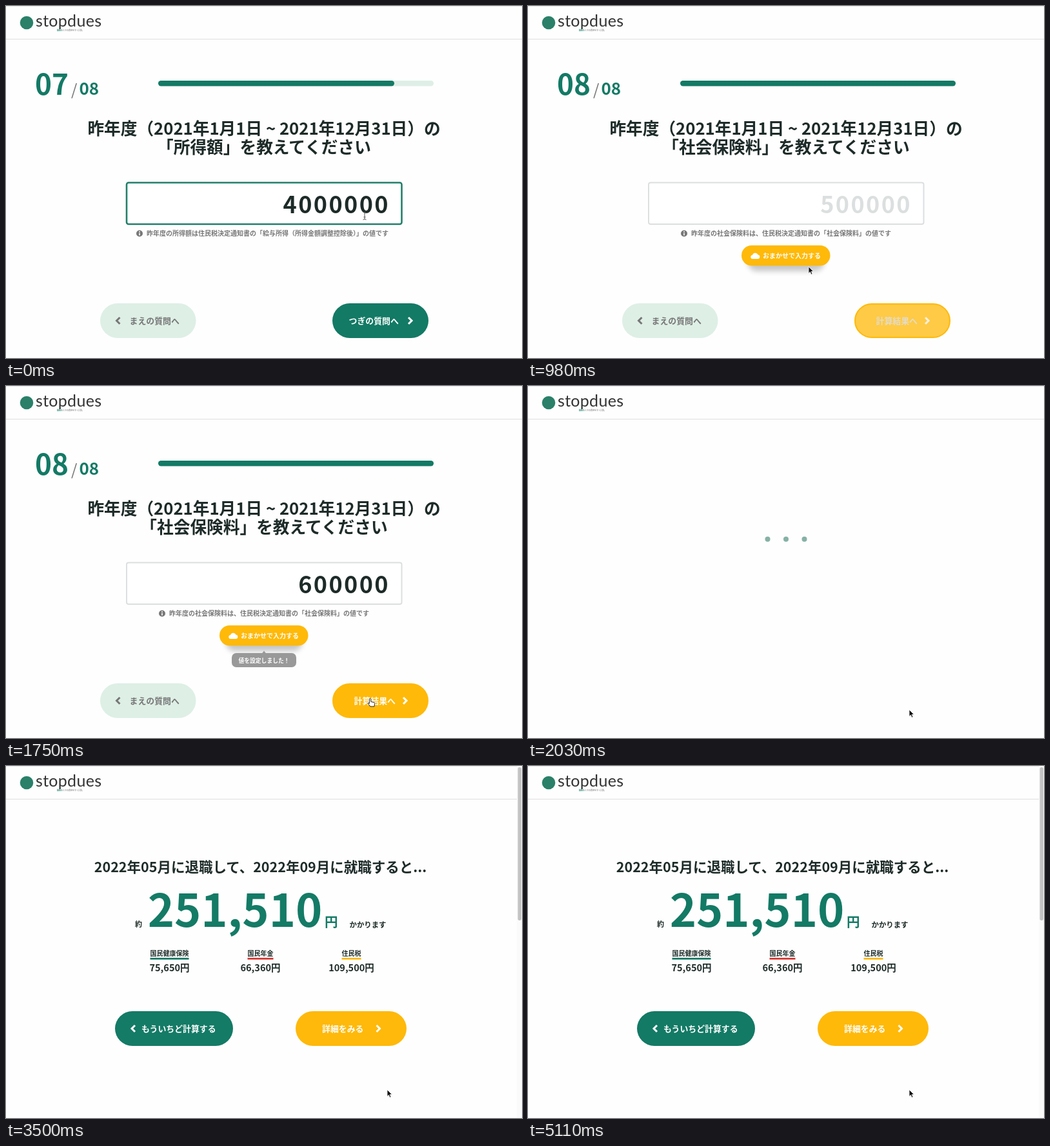
Recreate the animation shown at these times as an HTML page. Size 800 px wide and 547 px high, loop 5600 ms.

```html
<!DOCTYPE html>
<html lang="ja">
<head>
<meta charset="utf-8">
<title>退職費用の計算</title>
<style>
  html, body { margin: 0; width: 100%; height: 100%; overflow: hidden; background: #fefefe; }
  svg { display: block; width: 800px; height: 547px; }
  text { font-family: "Noto Sans CJK JP", "Noto Sans CJK", "Noto Sans", sans-serif; font-weight: 700; fill: #1d2b28; white-space: pre; }
  .mid { text-anchor: middle; }
  .green { fill: #137a65; }
  .white { fill: #fff; }
  .grey { fill: #777; }
  .title { font-size: 25.7px; text-anchor: middle; }
  .value { font-size: 36px; letter-spacing: 2.4px; text-anchor: end; }
  .hint { font-size: 10px; }
  .label { font-size: 12.9px; }
  .chev { fill: none; stroke-width: 3; }
</style>
</head>
<body>
<svg viewBox="0 0 800 547">
  <defs>
    <filter id="soft" x="-20%" y="-60%" width="140%" height="220%"><feGaussianBlur stdDeviation="4"/></filter>
  </defs>

  <g id="header">
    <path d="M0 .5H800" stroke="#e9e9e9"/>
    <path id="rule" d="M0 51.5H800" stroke="#dfdfdf"/>
    <circle cx="32" cy="26" r="10.3" fill="#2a8069"/>
    <text x="46" y="32" style="font:400 25px Lato,sans-serif;fill:#333;letter-spacing:.3px">stopdues</text>
    <text x="79" y="39" style="font-size:3px;fill:#999"><tspan class="green">辞めた</tspan>ときの費用をすぐ計算。</text>
  </g>

  <g id="form">
    <text id="step" class="green" x="45" y="138" font-size="44">07</text>
    <text x="101" y="139" style="font-size:24px;font-weight:400;fill:#777">/</text>
    <text class="green" x="113.5" y="138" font-size="26">08</text>
    <rect x="236" y="116" width="427" height="8.5" rx="4.2" fill="#deefe7"/>
    <rect id="bar" x="236" y="116" width="366" height="8.5" rx="4.2" fill="#137a65"/>

    <g id="body">
      <text class="title" x="400" y="200">昨年度（2021年1月1日 ~ 2021年12月31日）の</text>
      <text id="ask" class="title" x="400" y="229"></text>
      <rect id="box" x="187" y="274.5" width="426.5" height="64.5" rx="3" fill="#fff"/>
      <text id="value" class="value" x="595" y="322"></text>
      <g id="info">
        <circle cx="5" cy="353.5" r="5" fill="#777"/>
        <path d="M5 350v1.7M5 352.8v3.6" stroke="#fff" stroke-width="1.6"/>
        <text id="hint" class="hint grey" x="16" y="357"></text>
      </g>
    </g>

    <rect x="146" y="462" width="148.5" height="54" rx="27" fill="#deefe6"/>
    <path class="chev" d="M176.5 484l-5 5 5 5" stroke="#777"/>
    <text class="label grey" x="191.5" y="494">まえの質問へ</text>

    <g id="next">
      <rect x="506" y="462" width="149" height="54" rx="27" fill="#137a65"/>
      <path class="chev" d="M624 484l5 5-5 5" stroke="#fff"/>
      <text class="label white" x="531.5" y="494">つぎの質問へ</text>
    </g>

    <g id="last">
      <rect id="goBox" x="507" y="463" width="147" height="52" rx="26" stroke="#ffb909" stroke-width="2"/>
      <path id="goChev" class="chev" d="M616 484l5 5-5 5"/>
      <text id="goText" class="label" x="539.5" y="494">計算結果へ</text>
    </g>

    <g id="assist">
      <rect x="341" y="384" width="118" height="28" rx="14" fill="#000" opacity=".22" filter="url(#soft)"/>
      <rect id="autoBox" x="331" y="372" width="137.5" height="31.5" rx="15.7"/>
      <path d="M348.5 393a3 3 0 0 1-.4-6 4.3 4.3 0 0 1 8.2-.4 3.2 3.2 0 0 1-.3 6.4z" class="white"/>
      <text class="hint white" x="364" y="391.5">おまかせで入力する</text>
    </g>

    <g id="tip">
      <path d="M396.5 416l3.5-4.5 3.5 4.5z" fill="#999"/>
      <rect x="350" y="415" width="100" height="22" rx="7" fill="#999"/>
      <text class="white mid" x="400" y="429.5" font-size="8.8">値を設定しました！</text>
    </g>
  </g>

  <g id="dots" fill="#0c664c">
    <circle cx="371.5" cy="238" r="4"/>
    <circle cx="400" cy="238" r="4"/>
    <circle cx="428.5" cy="238" r="4"/>
  </g>

  <g id="result">
    <text class="mid" x="394.5" y="165" font-size="21.5">2022年05月に退職して、2022年09月に就職すると...</text>
    <text x="200" y="250" font-size="11">約</text>
    <text class="green mid" x="355" y="250" font-size="70">251,510</text>
    <text class="green" x="494" y="250" font-size="20.5">円</text>
    <text x="532.5" y="251" font-size="11.4">かかります</text>
    <g id="parts"></g>
    <rect x="169" y="381" width="183" height="54" rx="27" fill="#137a65"/>
    <path class="chev" d="M200 403l-5 5 5 5" stroke="#fff"/>
    <text class="label white" x="210" y="413">もういちど計算する</text>
    <rect x="449" y="381" width="172" height="54" rx="27" fill="#ffb909"/>
    <path class="chev" d="M574.5 403l5 5-5 5" stroke="#fff"/>
    <text class="label white" x="490" y="413">詳細をみる</text>
  </g>
  <g id="scroll">
    <rect x="792" y="0" width="8" height="547" fill="#fafafa"/>
    <rect x="793.5" y="2" width="5.5" height="238" rx="2.7" fill="#c3c3c3"/>
  </g>

  <circle id="ripple" fill="none" stroke="#f6c668" stroke-width="1.5"/>
  <g id="pointer">
    <path id="arrow" d="M0 0v10.5l2.4-2.2 1.7 3.9 1.9-.8-1.7-3.8h3.3z" fill="#111" stroke="#fff" stroke-width=".8"/>
    <path id="hand" d="M-1.2 1.2q1.2-2 2.4 0v4.3l5 1.2q1.3.5 1 2L6.3 13H.2l-4-5q.3-1.5 2.6.4z" fill="#fff" stroke="#222"/>
    <path id="beam" d="M-2.5-6Q0-6 0-4.5 0-6 2.5-6M0-4.5v9M-2.5 6Q0 6 0 4.5 0 6 2.5 6M-1.5 2h3" fill="none" stroke="#555"/>
  </g>
</svg>
<script>
const LOOP = 5600, TICK = 70, RIPPLE = 140;
const el = {};
document.querySelectorAll('[id]').forEach(n => el[n.id] = n);

const at = { turn: 490, fill: 1400, send: 1890, load: 1960, loaded: 3220, result: 3290 };
const pages = [
  { step: '07', ask: '「所得額」を教えてください', x: 202,
    hint: '昨年度の所得額は住民税決定通知書の「給与所得（所得金額調整控除後）」の値です' },
  { step: '08', ask: '「社会保険料」を教えてください', x: 237,
    hint: '昨年度の社会保険料は、住民税決定通知書の「社会保険料」の値です' }
];
// time, x, y
const path = [
  [0, 556, 326], [70, 556, 326], [420, 577, 491], [630, 577, 491],
  [980, 435, 405], [1190, 422, 388], [1540, 422, 388], [1820, 591, 503]
];
const clicks = [[at.turn, 577, 491], [at.fill, 425, 389], [at.send, 591, 503]];

const clamp = v => Math.min(1, Math.max(0, v));
const ease = v => v * v * (3 - 2 * v);
const out = v => 1 - (1 - v) ** 3;
const ramp = (t, from, span) => clamp((t - from) / span);
const set = (n, props) => { for (const k in props) n.setAttribute(k, props[k]); };
const fade = (n, v) => { n.style.opacity = v; n.style.display = v > 0 ? '' : 'none'; };
const inside = (x, y, l, t, r, b) => x >= l && x <= r && y >= t && y <= b;
const onNext = (x, y) => inside(x, y, 506, 462, 655, 516);
const onAssist = (x, y) => inside(x, y, 331, 372, 468, 403);

el.parts.innerHTML = [
  [253.5, 60, '国民健康保険', '75,650円', '#137a65'],
  [394.5, 40, '国民年金', '66,360円', '#d63a35'],
  [535.5, 30, '住民税', '109,500円', '#ffb909']
].map(([x, w, name, sum, color]) => `
  <text class="mid" x="${x}" y="295" font-size="10">${name}</text>
  <rect x="${x - w / 2}" y="298" width="${w}" height="2.8" fill="${color}"/>
  <text class="mid" x="${x}" y="319" font-size="14.5">${sum}</text>`).join('');

function place(t) {
  const i = path.findIndex(p => p[0] > t);
  if (i < 0) return path[path.length - 1].slice(1);
  const [t0, x0, y0] = path[i - 1], [t1, x1, y1] = path[i];
  const k = ease((t - t0) / (t1 - t0));
  return [x0 + (x1 - x0) * k, y0 + (y1 - y0) * k];
}

function drawForm(t, x, y) {
  const second = t >= at.turn, filled = t >= at.fill;
  const page = pages[+second];
  fade(el.form, 1 - ramp(t, at.send, 140));
  el.step.textContent = page.step;
  el.ask.textContent = page.ask;
  el.hint.textContent = page.hint;
  set(el.info, { transform: `translate(${page.x})` });
  set(el.bar, { width: 427 * (6 + out(ramp(t, at.turn, 280))) / 7 });
  fade(el.body, second ? 0.3 + 0.7 * ramp(t, at.turn, 210) : 1);
  set(el.box, { stroke: second ? '#dcdfdf' : '#237f6b', 'stroke-width': second ? 2 : 2.6 });
  el.value.textContent = !second ? '4000000' : filled ? '600000' : '500000';
  el.value.style.fill = second && !filled ? '#dcdfdf' : '';

  fade(el.next, second ? 0 : onNext(x, y) ? 0.85 : 1);
  fade(el.last, +second);
  set(el.goBox, { fill: filled ? '#ffb909' : '#ffca45' });
  set(el.goChev, { stroke: filled ? '#fff' : '#f6f0e0' });
  el.goText.style.fill = filled ? '#fff' : '#e2dccb';
  fade(el.assist, second ? ramp(t, at.turn, 210) : 0);
  set(el.autoBox, { fill: onAssist(x, y) ? '#ffbf37' : '#ffb909' });
  fade(el.tip, filled ? ramp(t, at.fill - 70, 140) : 0);
}

function drawPointer(t, x, y) {
  const link = t < at.load && (onNext(x, y) || t > at.turn && onAssist(x, y));
  const kind = t <= 70 ? 'beam' : link ? 'hand' : 'arrow';
  for (const k of ['arrow', 'hand', 'beam']) fade(el[k], +(k === kind));
  set(el.pointer, { transform: `translate(${x} ${y})` });

  const hit = clicks.find(c => t >= c[0] && t < c[0] + RIPPLE);
  fade(el.ripple, hit ? 1 - (t - hit[0]) / RIPPLE : 0);
  if (hit) set(el.ripple, { cx: hit[1], cy: hit[2], r: 10 + (t - hit[0]) / 10 });
}

function draw(t) {
  const [x, y] = place(t);
  drawForm(t, x, y);
  drawPointer(t, x, y);

  fade(el.dots, +(t >= at.load && t < at.loaded));
  [...el.dots.children].forEach((dot, i) => {
    const wait = t - at.load - 70 - i * 144;
    dot.style.opacity = 0.5 + (wait > 0 ? 0.3 * Math.max(0, Math.sin(wait / 180)) : 0);
  });

  const shown = t >= at.result;
  fade(el.result, shown ? out(ramp(t, at.result - 70, 350)) : 0);
  fade(el.scroll, +shown);
  set(el.rule, { d: `M0 51.5H${shown ? 792 : 800}` });
}

const start = performance.now();
function frame() {
  const t = (performance.now() - start) % LOOP;
  draw(Math.floor(t / TICK) * TICK);
  requestAnimationFrame(frame);
}
frame();
</script>
</body>
</html>
```
